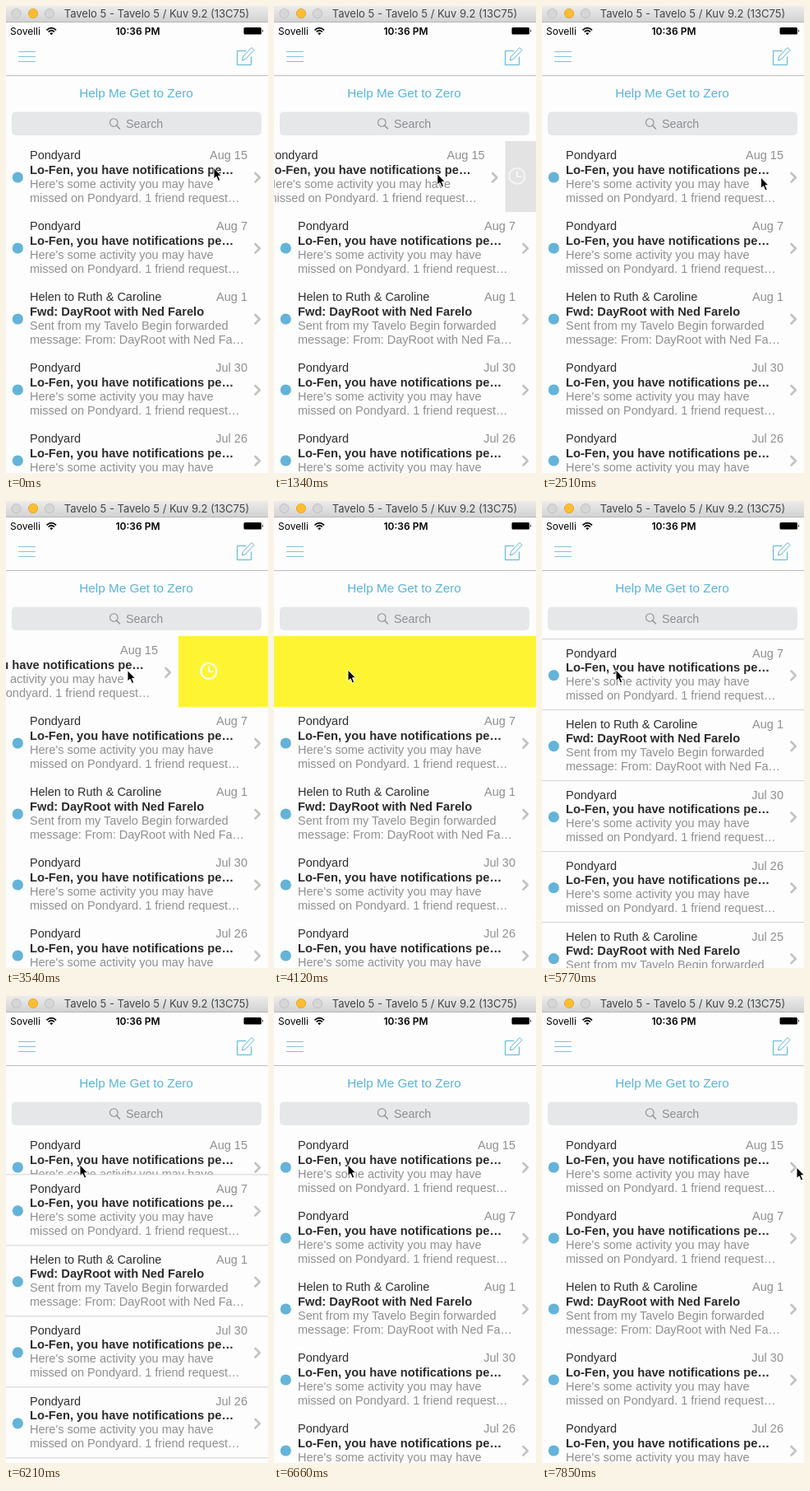
An HTML page that plays this animation: 319 by 567 pixels, repeating every 7990 ms.

```html
<!DOCTYPE html>
<html lang="en">
<head>
<meta charset="utf-8">
<title>Mail list</title>
<style>
  html, body { margin: 0; width: 100%; height: 100%; overflow: hidden; background: #fdfdfd; }
  svg { display: block; width: 319px; height: 567px; }
  text { font: 14.5px "Liberation Sans", Arial, sans-serif; white-space: pre; }
  .ui { font-family: Inter, Roboto, sans-serif; font-size: 12px; }
  .bold { font-size: 14.7px; font-weight: 700; fill: #2b2b2b; }
  .dark { fill: #2e2e2e; }
  .soft { fill: #8f8f8f; }
  .mid { text-anchor: middle; }
  .end { text-anchor: end; }
  .line { fill: none; stroke-linecap: round; stroke-linejoin: round; }
  .label { font-size: 14.3px; fill: #fff; text-anchor: middle; }
</style>
</head>
<body>
<svg viewBox="0 0 319 567">
  <defs>
    <linearGradient id="bar" x2="0" y2="1">
      <stop stop-color="#ececec"/><stop offset="1" stop-color="#d2d2d2"/>
    </linearGradient>
    <linearGradient id="band" x2="0" y2="1">
      <stop stop-color="#6c5c2c" stop-opacity="0"/>
      <stop offset=".1" stop-color="#6c5820" stop-opacity=".75"/>
      <stop offset=".19" stop-color="#6c5412"/>
      <stop offset=".68" stop-color="#6c5412"/>
      <stop offset=".86" stop-color="#6c5c2c" stop-opacity=".55"/>
      <stop offset="1" stop-color="#6c6c6c" stop-opacity="0"/>
    </linearGradient>
    <linearGradient id="ring" gradientUnits="userSpaceOnUse" x1="0" y1="136" x2="0" y2="280">
      <stop stop-color="#f0f0ea"/><stop offset=".18" stop-color="#ecc94a"/>
      <stop offset=".75" stop-color="#e6c23e"/><stop offset="1" stop-color="#ececec"/>
    </linearGradient>
    <filter id="blur" x="-20%" y="-50%" width="140%" height="200%"><feGaussianBlur stdDeviation="1.8"/></filter>
  </defs>

  <rect width="319" height="567" fill="#fdfdfd"/>

  <g class="line" stroke-width="1">
    <path d="M15.5 55.5H35.5M15.5 61.5H35.5M15.5 67.5H35.5" stroke="#86bfd9"/>
    <path d="M0 84.5H319" stroke="#bdbdbd"/>
    <path d="M292 54.5H281.5V71.5H298.5V62M287.5 65.5L288.5 61.5 299 50.5 302 53.5 291.5 64.5Z" stroke="#58b3da"/>
  </g>
  <text class="mid" x="158.5" y="111" style="font-size:15.3px" fill="#58b3da">Help Me Get to Zero</text>
  <rect x="7" y="128.5" width="304" height="28.5" rx="5" fill="#e6e7e9"/>
  <path class="line" d="M134.8 145.3L138.5 149" stroke="#8e8e93" stroke-width="1.3"/>
  <circle cx="131.3" cy="141.5" r="4.8" fill="none" stroke="#8e8e93" stroke-width="1.1"/>
  <text x="146" y="147.5" style="font-size:14.3px" fill="#8e8e93">Search</text>

  <rect id="panel" y="164" width="319" height="86"/>
  <g id="clock" class="line" stroke="#fff" stroke-width="2.2">
    <circle r="9.5"/><path d="M0 -5.5V.5H5"/>
  </g>
  <g id="message"></g>
  <g id="feed"></g>

  <g id="modal">
    <rect y="20" width="319" height="547" fill="#6c6d6d"/>
    <g filter="url(#blur)" fill="#5f6060">
      <rect x="78" y="46" width="158" height="34" rx="16"/>
      <path d="M0 128Q30 116 70 124T230 122T319 130V170H0Z" opacity=".5"/>
      <path id="blot" d="M26 356Q60 340 110 350T215 360Q258 366 246 380T140 388Q60 392 30 380Q14 368 26 356Z" opacity=".75"/>
      <use href="#blot" y="86"/><use href="#blot" y="171"/><use href="#blot" y="-86" opacity=".6"/>
    </g>
    <rect y="140" width="319" height="135" fill="url(#band)"/>
    <g id="choices"></g>

    <g fill="#fff" stroke="#fff" stroke-linecap="round" stroke-linejoin="round">
      <g stroke="none">
        <circle cx="60" cy="176" r="16.5"/>
        <path d="M58 158h4v4h-4zM71 160l4 4-3 3-4-4z"/>
      </g>
      <circle cx="60" cy="155.5" r="7" fill="none" stroke-width="2.5"/>
      <path d="M55 182L68 168" stroke="#6c5412" stroke-width="1.6"/>
      <circle cx="60" cy="176.500" r="1.8" stroke="none"/>

      <path stroke="none" d="M149 155A19.5 19.5 0 1 0 177 179.500A20 20 0 0 1 149 155Z"/>

      <path stroke="none" d="M244 159H272V177Q272 183 266 183H250Q244 183 244 177ZM240 184.500H276Q274 188 269 188H247Q242 188 240 184.500Z"/>
      <path fill="none" stroke-width="2" d="M272 163H274Q277 163 277 166V172Q277 176 272 177"/>

      <circle cx="60" cy="292" r="12" stroke="none"/>
      <g id="rays" stroke-width="1.2"></g>

      <rect x="141" y="280" width="36" height="25" rx="2.5" stroke="none"/>
      <path fill="none" stroke-width="2.3" d="M152 280V276Q152 274 154 274H164Q166 274 166 276V280"/>
      <path d="M141 291.500H177" stroke="#676868" stroke-width="1.2"/>
      <rect x="155" y="290" width="8" height="4" stroke="#676868" stroke-width="1"/>

      <rect x="243" y="277" width="30" height="32" stroke="none"/>
      <path d="M243 284.500H273" stroke="#676868" stroke-width="1.2"/>
      <path d="M251 274V279M265 274V279" stroke="#676868" stroke-width="4"/>
      <path d="M251 273.500V279M265 273.500V279" stroke-width="1.8"/>

      <path stroke="none" d="M46 422A8 8 0 0 1 45 406.500A8 8 0 0 1 53 402A12 12 0 0 1 75 406A8.200 8.200 0 0 1 74 422Z"/>
      <path stroke-width="1.3" d="M49 426l-3 4.500m9.500-4.500l-3 4.500m9.500-4.500l-3 4.500m9.500-4.500l-3 4.500m9.500-4.500l-3 4.500"/>

      <rect x="141" y="399.500" width="36" height="27" rx="3" stroke="none"/>
      <rect x="144" y="402.500" width="30" height="20.500" rx="1" fill="none" stroke="#676868" stroke-width="1"/>
      <path stroke="none" d="M154 427H164L168 431H150Z"/>

      <text class="mid" x="258" y="426" style="font:300 36px Roboto, sans-serif" fill="none" stroke-width=".9">08</text>
    </g>
  </g>

  <rect width="319" height="19.5" fill="url(#bar)"/>
  <path d="M0 19.5H319" stroke="#b4b4b4"/>
  <g fill="#d6d6d6" stroke="#b9b9b9" stroke-width=".8">
    <circle cx="12.5" cy="9" r="5.6"/>
    <circle cx="33" cy="9" r="5.6" fill="#fdbd2f" stroke="#dfa023"/>
    <circle cx="53" cy="9" r="5.6"/>
  </g>
  <text class="ui mid" x="183.5" y="14" style="font-size:13px" fill="#454545">Tavelo 5 - Tavelo 5 / Kuv 9.2 (13C75)</text>

  <text class="ui" x="5" y="34.5">Sovelli</text>
  <g fill="none" stroke="#000" stroke-width="1.7">
    <path d="M49.5 29.3Q55.3 23.9 61 29.3M51.6 31.5Q55.3 28 58.9 31.5"/>
    <path d="M53.2 33L55.3 35.3 57.3 33Q55.3 31.3 53.2 33Z" fill="#000" stroke="none"/>
  </g>
  <text class="ui mid" x="160.5" y="34.5" style="font-weight:600">10:36 PM</text>
  <rect x="289.5" y="26" width="21.5" height="8.5" rx="1.5"/>
  <path d="M312 28.5Q314 30.2 312 32Z"/>

  <path id="cursor" d="M.5 .5V14L3.6 11.2 5.9 16.5 8.3 15.5 6 10.3H10Z" stroke="#fff" stroke-width="1" stroke-linejoin="round"/>
</svg>
<script>
const $ = id => document.getElementById(id);
const LOOP = 7990, RETURN = 5770;

const notice = ['Pondyard', 'Lo-Fen, you have notifications pe…',
  "Here's some activity you may have", 'missed on Pondyard. 1 friend request…'];
const forward = ['Helen to Ruth & Caroline', 'Fwd: DayRoot with Ned Farelo',
  'Sent from my Tavelo Begin forwarded', 'message: From: DayRoot with Ned Fa…'];

const esc = s => s.replace('&', '&amp;');
const row = ([from, subject, a, b], date, y) => `<g transform="translate(0 ${y})">
  <rect width="319" height="87" fill="#fdfdfd"/>
  <circle cx="14.3" cy="44" r="6.6" fill="#64b3d9"/>
  <text class="dark" x="29" y="22">${esc(from)}</text>
  <text class="soft end" x="294" y="22">${date}</text>
  <text class="bold" x="29" y="39.5">${subject}</text>
  <text class="soft" x="29" y="56.5">${a}</text>
  <text class="soft" x="29" y="73.5">${b}</text>
  <path class="line" d="M303.5 39L308.8 44.3 303.5 49.6" stroke="#c2c2c4" stroke-width="2.7"/></g>`;

$('message').innerHTML = row(notice, 'Aug 15', 164);
const mails = [[notice, 'Aug 7'], [forward, 'Aug 1'], [notice, 'Jul 30'], [notice, 'Jul 26'], [forward, 'Jul 25']];
$('feed').innerHTML = mails.map(([mail, date], i) => row(mail, date, 250 + 86 * i)).join('') +
  `<path id="rules" d="${mails.map((_, i) => `M0 ${250 + 86 * i}H319`).join('')}" stroke="#d2d2d2"/>`;

const names = ['Later Today', 'This Evening', 'Tomorrow', 'This Weekend', 'Next Week',
  'In a Month', 'Someday', 'Desktop', 'Pick Date'];
$('choices').innerHTML = names.map((name, i) => {
  const x = 60 + 99 * (i % 3), y = 173 + 120 * Math.floor(i / 3);
  return `<circle cx="${x}" cy="${y}" r="36.8" fill="none" stroke="url(#ring)" stroke-width="1.4"/>
    <text class="label" x="${x}" y="${y + 58}">${name}</text>`;
}).join('');
$('rays').innerHTML = [...Array(8)].map((_, i) =>
  `<path d="M60 276V270" transform="rotate(${45 * i} 60 292)"/>`).join('');

// Pointer path as [time, x, y].
const pointer = [[0, 252.5, 196], [147, 251.5, 197], [300, 251.5, 197], [1040, 194, 203], [1250, 194, 203],
  [2504, 266, 207.5], [3535, 147.5, 205], [3900, 89.5, 204.5], [6665, 89.5, 204.5],
  [6810, 98, 210], [7150, 150, 330], [7330, 195, 361], [7550, 250, 325], [7848, 309.5, 207.5]];

// A drag moves the row with the pointer, then lets it glide to its rest.
const drags = [
  { from: 300, to: 1250, grab: 242, rest: 0 },
  { from: 2500, to: 3900, grab: 256.5, rest: -380 },
];
const GLIDE = 250;

const mix = (a, b, k) => a + (b - a) * k;
const part = (t, from, span) => Math.max(0, Math.min(1, (t - from) / span));
const ease = k => k * k * (3 - 2 * k);

function pointerAt(t) {
  const i = pointer.findIndex(p => p[0] > t);
  if (i < 0) return pointer[pointer.length - 1].slice(1);
  const [ta, xa, ya] = pointer[i - 1], [tb, xb, yb] = pointer[i];
  const k = (t - ta) / (tb - ta);
  return [mix(xa, xb, k), mix(ya, yb, k)];
}

function rowAt(t) {
  const drag = drags.filter(d => t >= d.from).pop();
  if (!drag || t >= RETURN) return 0;
  const pulled = Math.min(0, pointerAt(Math.min(t, drag.to))[0] - drag.grab);
  return mix(pulled, drag.rest, ease(part(t, drag.to, GLIDE)));
}

const held = t => t < RETURN
  ? Math.floor((t + 6) / 147.3) * 147.3
  : RETURN + Math.floor((t - RETURN) / 148.5 + .06) * 148.5;

const move = (id, x, y) => $(id).setAttribute('transform', `translate(${x} ${y})`);

function draw(now) {
  const t = held(now % LOOP), x = rowAt(t);
  move('message', x, 0);
  move('cursor', ...pointerAt(t));
  move('clock', Math.min(296, 319 + x + 37), 206.5);
  $('clock').style.opacity = Math.min(1, -x / 60);
  $('panel').setAttribute('fill', x > -60 ? '#e3e3e3' : '#fff431');

  const lift = t < RETURN ? 0 : -86 * (1 - ease(part(t, 5650, 980)));
  move('feed', 0, lift);
  $('rules').style.opacity = lift < 0 ? 1 : 0;
  $('modal').style.opacity = t < RETURN ? part(t, 4150, 250) : 0;
  requestAnimationFrame(draw);
}
draw(performance.now());
</script>
</body>
</html>
```
